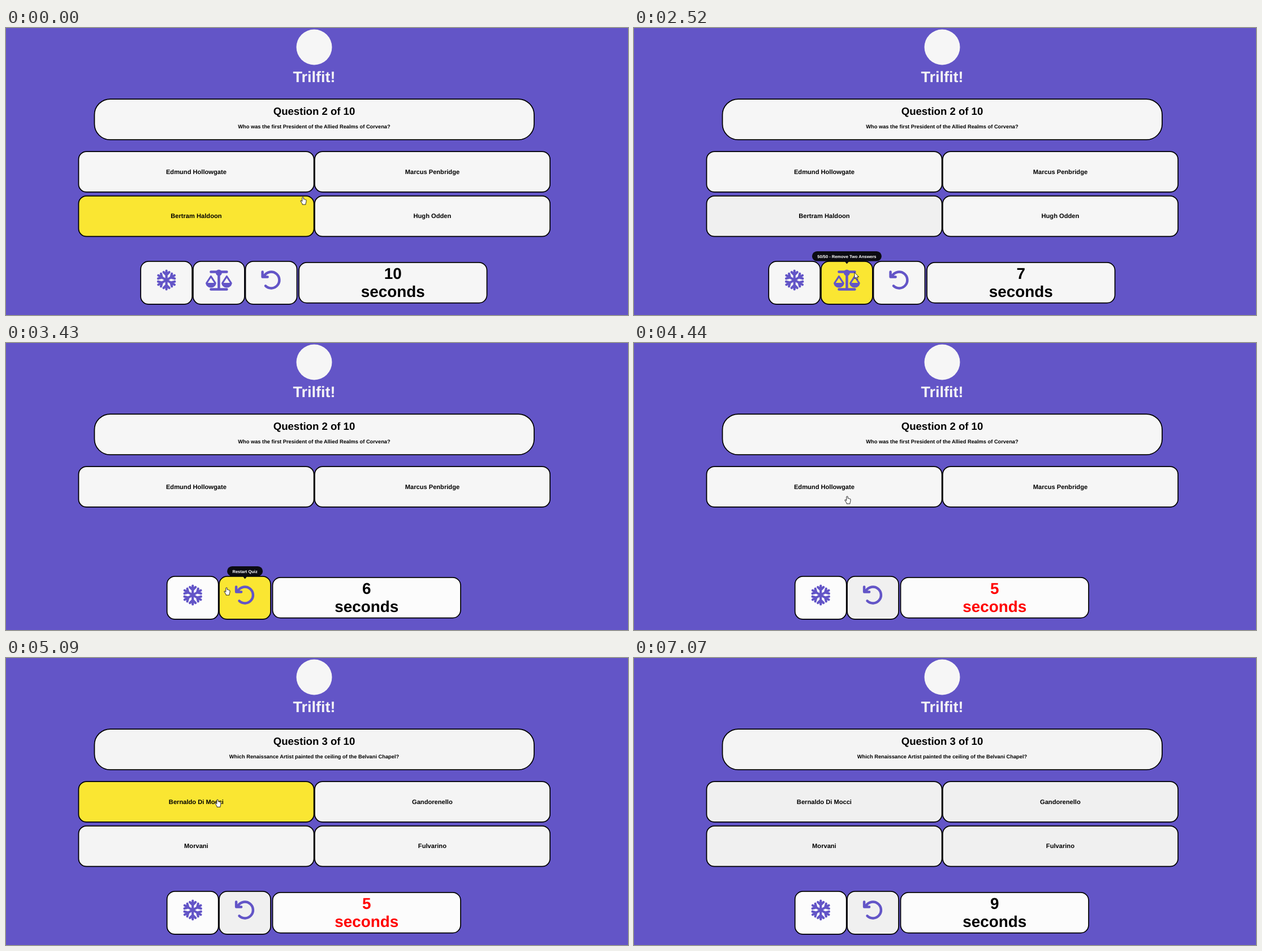
Recreate the animation shown at these times as an HTML page. Size 1100 by 509 pixels, loop 7190 ms.

```html
<!DOCTYPE html>
<html lang="en">
<head>
<meta charset="utf-8">
<title>Quiz</title>
<style>
  html, body { margin: 0; height: 100%; overflow: hidden; background: #6355c7; }
  svg { display: block; width: 100vw; height: 100vh; }
  text { font-family: "Liberation Sans", Arial, sans-serif; font-weight: bold; text-anchor: middle; text-rendering: geometricPrecision; }
  .icon { fill: none; stroke: #6355c7; stroke-width: 4.5; stroke-linecap: round; stroke-linejoin: round; }
  .solid { fill: #6355c7; stroke: none; }
</style>
</head>
<body>
<svg id="stage" viewBox="0 0 1100 509"></svg>
<script>
const LOOP = 7190, SECOND = 1003;
// Moments of the story: click on 50/50, answers removed, next question, timer reset
const CLICK = 2520, SPLIT = 2660, NEXT = 5090, RESET = 6060;
const EM = 9.29;
const stage = document.getElementById('stage');

const rounds = [
  { title: 'Question 2 of 10',
    ask: 'Who was the first President of the Allied Realms of Corvena?',
    answers: ['Edmund Hollowgate', 'Marcus Penbridge', 'Bertram Haldoon', 'Hugh Odden'] },
  { title: 'Question 3 of 10',
    ask: 'Which Renaissance Artist painted the ceiling of the Belvani Chapel?',
    answers: ['Bernaldo Di Mocci', 'Gandorenello', 'Morvani', 'Fulvarino'] }
];

// Pointer moves from its first place
const home = { x: 525, y: 299.5 };
const moves = [
  { from: 100, to: 270, x: 496, y: 313 },
  { from: 300, to: 1020, x: 392, y: 421 },
  { from: 1120, to: 1410, x: 390, y: 433.5 },
  { from: 3900, to: 4440, x: 377, y: 271.5 },
  { from: 4500, to: 4710, x: 374, y: 250.7 },
  { from: 5300, to: 5610, x: 379, y: 256 },
  { from: 5700, to: 6120, x: 860, y: 400 }
];

const repeat = (list, draw) => list.map(draw).join('');

const icons = {
  snow: repeat([0, 1, 2, 3, 4, 5], i =>
    `<path transform="rotate(${i * 60})" stroke-width="4.2" d="M0 0V-16.5M-5 -14L0 -9L5 -14"/>`),
  scales: '<path d="M-14 -14.5H14M0 -14V16.5M-14 16.5H14"/><circle class="solid" cy="-13" r="5.5"/>' +
    repeat([-14, 14], x => `<g transform="translate(${x})"><path stroke-width="3.2" d="M-7.5 5L0 -6.5L7.5 5"/>
      <path class="solid" d="M-9.5 5H9.5Q8 13.5 0 13.5T-9.5 5Z"/></g>`),
  restart: '<path d="M-12 -8A14.4 14.4 0 1 1 -10 10.4M-15.4 -14.5V-5.5H-6.4"/>'
};

const ramp = (t, from, to) => Math.min(1, Math.max(0, (t - from) / (to - from)));
const ease = k => k * k * (3 - 2 * k);

// Grey base blended towards the yellow hover colour
const shade = (grey, hover = 0) =>
  `rgb(${[250, 230, 50].map(v => Math.round(grey + (v - grey) * hover))})`;

const box = (x, y, w, h, r, fill) =>
  `<rect x="${x}" y="${y}" width="${w}" height="${h}" rx="${r}" fill="${fill}" stroke="#000" stroke-width="1.75"/>`;

const label = (x, y, size, str, fill = '#000') =>
  `<text x="${x}" y="${y}" font-size="${size}" fill="${fill}">${str}</text>`;

function answer(i, str, fill) {
  const x = 128.4 + i % 2 * 417.5, y = 219 + (i > 1 ? 78.8 : 0);
  return box(x, y, 416.2, 71.9, 14, fill) + label(x + 208, y + 39.6, EM * 1.2, str);
}

const button = (x, icon, fill) => box(x - 45.5, 413.9, 91, 76, 14, fill) +
  `<g class="icon" transform="translate(${x} 447)">${icons[icon]}</g>`;

function timer(x, left, fill) {
  const ink = left > 5 ? '#000' : '#f00';
  return box(x - 166.2, 415.9, 332.5, 71.7, 14, fill) +
    label(x, 445, EM * 3, left, ink) + label(x, 477, EM * 3, 'seconds', ink);
}

// Tooltip swings up into place as k goes from 0 to 1
const tooltip = (x, w, str, k) =>
  `<g opacity="${k}" transform="translate(${x} ${405 + 20 * (1 - k)}) rotate(${27 * (1 - k)})">
    <rect x="${-w / 2}" y="-9" width="${w}" height="17.6" rx="8.8" fill="#0b0b12"/>
    <path d="M-4.5 8H4.5L0 13.5Z" fill="#0b0b12"/>${label(0, 2.6, 7.5, str, '#fff')}</g>`;

function pointer(t) {
  if (t >= moves[moves.length - 1].to) return '';
  let { x, y } = home;
  for (const m of moves) {
    const k = ease(ramp(t, m.from, m.to));
    x += (m.x - x) * k;
    y += (m.y - y) * k;
  }
  const split = t >= SPLIT && t < NEXT;
  const gap = y > (split ? 292 : 371) && y < 413;
  const arrow = gap || t >= CLICK && t < SPLIT;
  const d = arrow
    ? 'M0 0V11L2.5 8.6L4.2 12.4L5.9 11.7L4.3 8H7.6Z'
    : 'M-1.2 1V8L-2.8 6.6Q-4.4 6 -4 7.6L-1 12.2V13.6H5V12Q6.3 9 6 5.5Q5.4 4.4 4.4 5Q4 3.8 2.8 4.4Q2 3.6 1.2 4V1Q0 -.4 -1.2 1Z';
  return `<path transform="translate(${x} ${y})" d="${d}" fill="#fff" stroke="#111" stroke-width=".9" stroke-linejoin="round"/>`;
}

// The clock waits at 5 until the next question restarts it
const seconds = t => t < RESET
  ? 10 - Math.min(5, Math.floor((t + 583) / SECOND))
  : 10 - Math.floor((t - RESET) / SECOND);

function scene(t) {
  const split = t >= SPLIT, next = t >= NEXT;
  const { title, ask, answers } = rounds[+next];
  const shift = split ? 46.5 : 0;
  const panel = next ? 244 : 246, tray = split ? 252 : 246;
  const hover = [
    ramp(t, 4500, 4710) - ramp(t, 5760, 6000), 0,
    1 - ramp(t, 540, 900), 0
  ];

  let s = '<circle cx="545" cy="34" r="31.5" fill="#f6f6f6"/>' + label(545, 96, 27, 'Trilfit!', '#f6f6f6') +
    box(156.4, 126, 777.6, 72.2, 28, shade(panel)) +
    label(545, 154.2, EM * 2, title) + label(545, 178, EM, ask);

  answers.forEach((str, i) => {
    const removed = i > 1 && split && !next;
    const dim = next ? t > 5760 : i === 2 && t > 420;
    if (!removed) s += answer(i, str, shade(dim ? 240 : panel, hover[i]));
  });

  s += button(283.7 + shift, 'snow', shade(tray));
  if (!split) s += button(376.4, 'scales', shade(t < 900 ? 246 : 240, ramp(t, 970, 1410)));
  s += button(469 - shift, 'restart', shade(split ? 240 : 246, ramp(t, 2600, 2780) - ramp(t, 3960, 4320)));
  s += timer(684.2 - shift, seconds(t), shade(tray));

  if (!split) s += tooltip(376.4, 123, '50/50 - Remove Two Answers', ramp(t, 900, 1170));
  else s += tooltip(422.6, 63, 'Restart Quiz', ramp(t, 2600, 2780) - ramp(t, 3960, 4320));
  return s + pointer(t);
}

function frame() {
  stage.innerHTML = scene(performance.now() % LOOP);
  requestAnimationFrame(frame);
}
frame();
</script>
</body>
</html>
```
